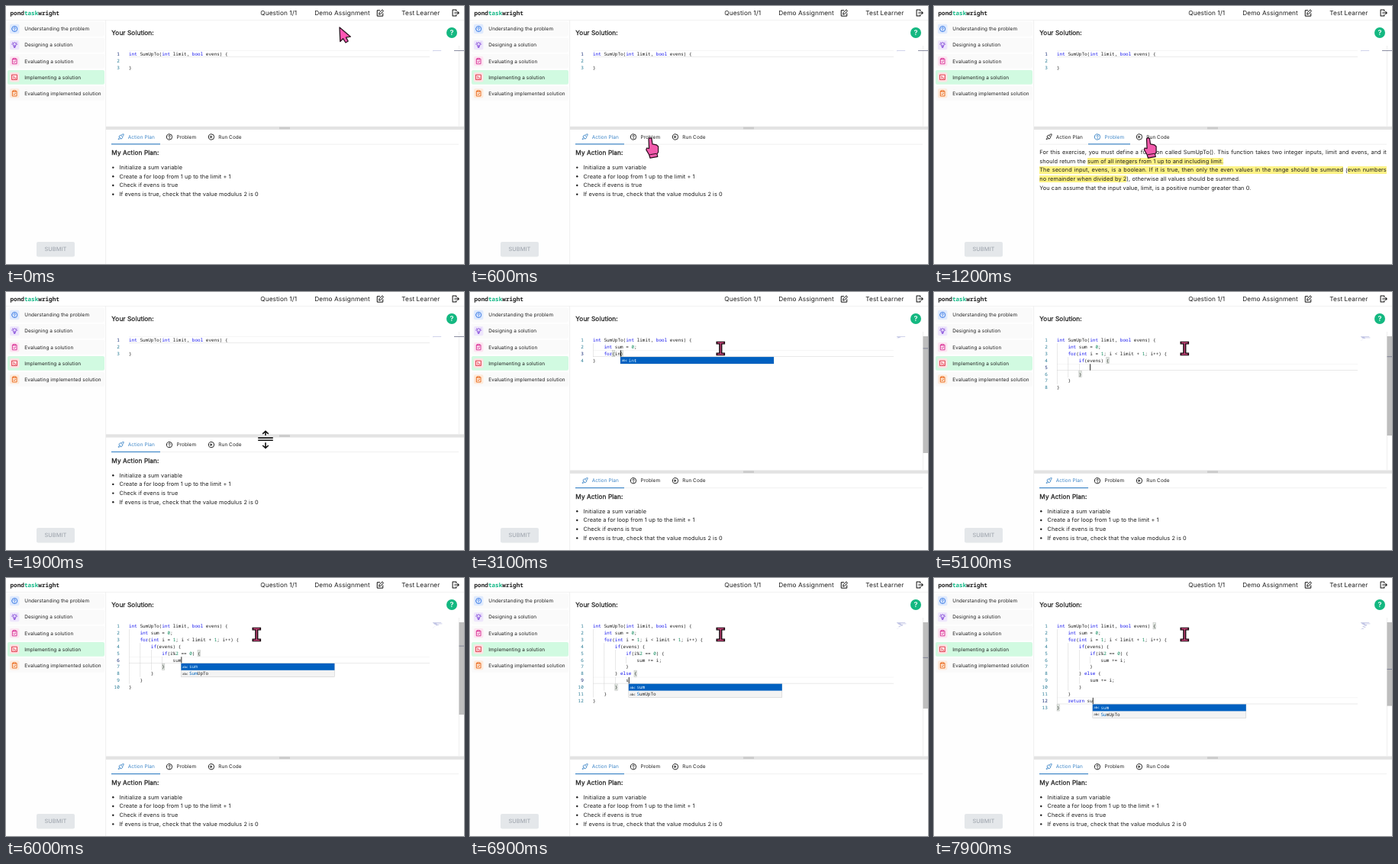
An HTML page for the animation above (8 s loop, 600 by 338 pixels).

```html
<!DOCTYPE html>
<html lang="en">
<head>
<meta charset="utf-8">
<title>Code exercise</title>
<style>
html, body { margin: 0; width: 100%; height: 100%; overflow: hidden; background: #fff; }
svg { display: block; width: 100vw; height: 100vh; text-rendering: geometricPrecision; }
text { font-family: Inter, sans-serif; fill: #1f1f1f; white-space: pre; letter-spacing: .01em; }
.mono, .mono text { font-family: "Noto Sans Mono", monospace; font-size: 6px; letter-spacing: 0; }
.heading { font-size: 8.28px; stroke: #1f1f1f; stroke-width: .28px; }
.para { font: 7.36px/11.75px Inter, sans-serif; color: #1f1f1f; white-space: nowrap; letter-spacing: .01em; }
.para .full { text-align: justify; text-align-last: justify; white-space: normal; height: 11.75px; }
mark { background: #fdf285; color: inherit; padding: .2px 0; }
.kw { fill: #1717ee; }
.num { fill: #098658; }
</style>
</head>
<body>
<svg id="stage" viewBox="0 0 600 338"></svg>
<script>
const stage = document.getElementById('stage');
const LOOP = 8000;
const CHAR = 3.6, LINE = 8.93, LEFT = 161, TOP = 58.3;

// ---------- drawing helpers ----------
const rect = (x, y, w, h, fill, extra = '') =>
  `<rect x="${x}" y="${y}" width="${w}" height="${h}" fill="${fill}" ${extra}/>`;
const text = (x, y, s, size, extra = '') =>
  `<text x="${x}" y="${y}" font-size="${size}" ${extra}>${s}</text>`;
const icon = (name, cx, cy, size, color, width = 2) =>
  `<g transform="translate(${cx - size / 2} ${cy - size / 2}) scale(${size / 24})" fill="none" stroke="${color}"
    stroke-width="${width}" stroke-linecap="round" stroke-linejoin="round"><path d="${ICONS[name]}"/></g>`;

const ICONS = {
  ask: 'M2 12a10 10 0 1 0 20 0a10 10 0 1 0-20 0M9 9.5a3 3 0 1 1 4.5 2.6q-1.5.8-1.5 2.4M12 17.5v.2',
  bulb: 'M9 17c0-3-3-4-3-8a6 6 0 0 1 12 0c0 4-3 5-3 8zM10 21h4M12 17v-5M2 9h1M21 9h1M4 3l1 1M20 3l-1 1',
  clip: 'M8 4H4v18h16V4h-4M8 2h8v4H8zM8 14l3 3 5-6',
  term: 'M3 3h18v18H3zM7 8l4 4-4 4M13 16h4',
  edit: 'M11 4H3v18h18v-8M9 16l1-5L19 2l4 4-9 9z',
  exit: 'M14 7V3H3v18h11v-4M9 12h13M18 8l4 4-4 4',
  rocket: 'M9 15l-4-4 4-5 4 0C16 3 19 2 22 2c0 3-1 6-4 9v4l-5 4zM6 15c-2 1-3 4-3 6 2 0 5-1 6-3M15 8v1',
  play: 'M2 12a10 10 0 1 0 20 0a10 10 0 1 0-20 0M10 9l5 3-5 3z'
};

// ---------- fixed parts ----------
function header() {
  return rect(0, 0, 600, 18.5, '#fff') + rect(0, 18, 600, .7, '#ececec') +
    `<text class="mono" x="5.5" y="11.6" style="font-size:7.66px;font-weight:700">pond<tspan fill="#12b886">task</tspan>wright</text>` +
    text(333.3, 12, 'Question 1/1', 8.28) + text(404.3, 12, 'Demo Assignment', 8.28) +
    icon('edit', 490, 9, 10, '#111', 2.4) +
    text(518.3, 12, 'Test Learner', 8.28) + icon('exit', 589, 9, 10.5, '#111', 2.3);
}

function sidebar() {
  const items = [
    ['Understanding the problem', 'ask', '#3478e5', '#dfeafd'],
    ['Designing a solution', 'bulb', '#8146d8', '#eee6fc'],
    ['Evaluating a solution', 'clip', '#d92d94', '#fce4f1'],
    ['Implementing a solution', 'term', '#e03445', '#fde2e4'],
    ['Evaluating implemented solution', 'clip', '#ea6a1c', '#fdeadb']
  ];
  return rect(0, 18.7, 130.5, 319.3, '#fefefe') + rect(130.3, 18.5, .8, 320, '#ececec') +
    items.map(([label, name, color, tint], i) => {
      const y = 30 + 21.1 * i;
      return rect(2, y - 9.4, 127, 18.8, i === 3 ? '#d1fae1' : '#fafafa', 'rx="2"') +
        rect(5, y - 6.2, 12.4, 12.4, tint, 'rx="2"') + icon(name, 11.2, y, 8.6, color, 2.6) +
        text(24.3, y + 2.3, label, 6.44);
    }).join('') +
    rect(40, 309, 50, 19.4, '#e4e7ea', 'rx="2"') +
    text(65, 321.4, 'SUBMIT', 7.36, 'text-anchor="middle" style="fill:#a3a9b1" font-weight="500"');
}

const TABS = [
  { label: 'Action Plan', icon: 'rocket', x: 138, w: 64, iconX: 150.5, textX: 159.8 },
  { label: 'Problem', icon: 'ask', x: 202, w: 55, iconX: 214, textX: 223.5 },
  { label: 'Run Code', icon: 'play', x: 257, w: 60, iconX: 269, textX: 278.3 }
];

function panel(active) {
  const tabs = TABS.map((tab, i) => {
    const color = i === active ? '#3f87c8' : '#1f1f1f';
    return icon(tab.icon, tab.iconX, 171.5, 8.8, color, 2.6) +
      text(tab.textX, 173.8, tab.label, 6.44, `style="fill:${color}"`) +
      (i === active ? rect(tab.x, 180.3, tab.w, 1.2, color) : '');
  }).join('');
  return rect(131, 157.8, 469, 4.4, '#e3e3e3') + rect(358, 158.6, 14, 2.8, '#cbcbcb') +
    rect(131, 162.2, 469, 260, '#fff') + rect(138, 180.8, 455, .6, '#e6e6e6') +
    tabs + (active === 0 ? plan() : problem());
}

function plan() {
  const steps = ['Initialize a sum variable', 'Create a for loop from 1 up to the limit + 1',
    'Check if evens is true', 'If evens is true, check that the value modulus 2 is 0'];
  return '<text class="heading" x="138.3" y="195">My Action Plan:</text>' + steps.map((s, i) => {
    const y = 211.4 + 11.7 * i;
    return `<circle cx="140.3" cy="${y + .2}" r="1.2" fill="#1f1f1f"/>` + text(148.5, y + 2.6, s, 7.36);
  }).join('');
}

function problem() {
  return `<foreignObject x="138.3" y="186" width="454.5" height="70"><div xmlns="http://www.w3.org/1999/xhtml" class="para">
    <div class="full">For this exercise, you must define a function called SumUpTo(). This function takes two integer inputs, limit and evens, and it</div>
    <div>should return the <mark>sum of all integers from 1 up to and including limit.</mark></div>
    <div class="full"><mark>The second input, evens, is a boolean. If it is true, then only the even values in the range should be summed</mark> (<mark>even numbers give</mark></div>
    <div><mark>no remainder when divided by 2</mark>), otherwise all values should be summed.</div>
    <div>You can assume that the input value, limit, is a positive number greater than 0.</div>
  </div></foreignObject>`;
}

// ---------- typing ----------
// "\n" is Enter; ↓ moves to the end of the next line.
const BURSTS = [
  [3100, 'int sum = 0;\nfor(in'],
  [4400, 't i = 1; i < limit + 1; i++) '],
  [6000, '{\nif(evens) {\nif(i%2 == 0) {\nsum'],
  [7900, ' += i;↓↓ else {\nsum += i;↓↓\nreturn su']
];
const TYPING_START = 2350, FOCUS = 2280;
const PAIRS = { '(': ')', '{': '}' };

function press({ before, after }, key) {
  if (key === '↓') {
    const end = (after + '\n').indexOf('\n', after.indexOf('\n') + 1);
    return { before: before + after.slice(0, end), after: after.slice(end) };
  }
  if (key === '\n') {
    const indent = before.split('\n').pop().match(/^ */)[0];
    return before.endsWith('{') && after.startsWith('}')
      ? { before: before + '\n' + indent + '    ', after: '\n' + indent + after }
      : { before: before + '\n' + indent, after };
  }
  if (key === ')' && after.startsWith(')')) return { before: before + key, after: after.slice(1) };
  return { before: before + key, after: (PAIRS[key] || '') + after };
}

const states = [{ before: 'int SumUpTo(int limit, bool evens) {\n    ', after: '\n}' }];
for (const key of BURSTS.map(b => b[1]).join('')) states.push(press(states[states.length - 1], key));

function keysAt(t) {
  let start = TYPING_START, done = 0;
  for (const [end, keys] of BURSTS) {
    if (t < end) return done + Math.max(0, Math.floor((t - start) / (end - start) * keys.length + 1e-6));
    done += keys.length;
    start = end;
  }
  return done;
}

function enclosingBrackets({ before, after }) {
  const scan = (s, i, step, enter, leave) => {
    for (let depth = 0; i >= 0 && i < s.length; i += step) {
      if (enter.includes(s[i])) depth++;
      else if (leave.includes(s[i]) && depth-- === 0) return i;
    }
    return -1;
  };
  const open = scan(before, before.length - 1, -1, ')}', '({');
  const close = scan(after, 0, 1, '({', ')}');
  return open < 0 || close < 0 ? [] : [open, before.length + close];
}

function suggestions({ before, after }) {
  const word = (before.match(/[A-Za-z]\w*$/) || [''])[0];
  if (!word) return { word, list: [] };
  const rest = before.slice(0, before.length - word.length) + ' ' + after;
  const list = [...new Set(rest.match(/[A-Za-z]\w+/g))]
    .filter(w => w.toLowerCase().startsWith(word.toLowerCase()))
    .sort((a, b) => a.length - b.length);
  return { word, list: list.length === 1 && list[0] === word ? [] : list };
}

// ---------- editor ----------
const place = (code, index) => {
  const lines = code.slice(0, index).split('\n');
  return { row: lines.length - 1, x: LEFT + lines.pop().length * CHAR };
};
const highlight = line => line.replace(/\b(?:int|bool|for|if|else|return)\b|\d+|</g, s =>
  s === '<' ? '&lt;' : `<tspan class="${/\d/.test(s) ? 'num' : 'kw'}">${s}</tspan>`);

function popup(state, caret) {
  const { word, list } = suggestions(state);
  if (!list.length) return '';
  const y = TOP + LINE * (caret.row + 1);
  const rows = list.map((w, i) => {
    const top = y + LINE * i, fg = i ? '#222' : '#fff', hit = i ? '#0066bf' : '#c6e6ff';
    return (i ? '' : rect(caret.x, top, 201, LINE, '#0060c0')) +
      `<text x="${caret.x + 1.5}" y="${top + 6}" style="font-size:4.2px;fill:${fg}">abc</text>` +
      `<text x="${caret.x + 10.6}" y="${top + 6.5}" style="fill:${fg}"><tspan fill="${hit}">${w.slice(0, word.length)}</tspan>${w.slice(word.length)}</text>`;
  }).join('');
  return rect(caret.x, y, 201, LINE * list.length, '#f3f3f3', 'stroke="#c8c8c8" stroke-width=".5"') + rows;
}

function editor(state, focused, height, hovered) {
  const code = state.before + state.after, lines = code.split('\n');
  const caret = focused ? place(code, state.before.length) : { row: 0, x: LEFT };
  const rowTop = TOP + LINE * caret.row;
  let out = rect(LEFT, rowTop, 394, .6, '#f0f0f0') + rect(LEFT, rowTop + LINE - .9, 394, .8, '#e4e4e4');
  lines.forEach((line, i) => {
    const y = TOP + LINE * i, indent = line.match(/^ */)[0].length / 4;
    if (focused) for (let k = 0; k < indent; k++) out += rect(LEFT + .2 + k * 4 * CHAR, y, .5, LINE, '#d0d0d0');
    const col = line.length - line.trimStart().length;
    if (line.trim()) out += rect(559 + col * .31, 58.2 + i * .75, (line.length - col) * .31, .5, '#7079c4', 'opacity=".65"');
  });
  if (focused) for (const index of enclosingBrackets(state)) {
    const { row, x } = place(code, index);
    out += rect(x, TOP + LINE * row + .3, CHAR, LINE - .6, '#e5ece5', 'stroke="#b9b9b9" stroke-width=".5"');
  }
  lines.forEach((line, i) => {
    const y = TOP + LINE * i + 6.6;
    out += `<text x="148.8" y="${y}" text-anchor="end" style="fill:${i === caret.row ? '#0b216f' : '#237893'}">${i + 1}</text>` +
      `<text x="${LEFT}" y="${y}">${highlight(line)}</text>`;
  });
  const total = height + (lines.length - 1) * LINE;
  out += rect(593.2, 52, .6, height + 5, '#e4e4e4');
  if (hovered) out += rect(593.5, 58, 6.5, height * height / total, '#bdbdbd');
  out += rect(hovered ? 593.5 : 587, 58 + caret.row * LINE / total * height, 13, .8, '#70748c');
  if (focused) out += rect(caret.x, rowTop + .3, .9, LINE - .6, '#111') + popup(state, caret);
  return out;
}

// ---------- pointer ----------
const RESIZE = 'M-9.8-1.5H9.8M-9.8 1.7H9.8M0-9V-4.6M0 4.6V10.5M-3.8-6.8L0-10.2 3.8-6.8M-3.8 8.4L0 11.8 3.8 8.4';
const POINTERS = {
  arrow: '<path d="M0 0L.8 18.5 4.6 14.8 8 20 11.2 18 8.4 13.2 14.4 12.2Z" fill="#ff55b4" stroke="#2a1420" stroke-width="1.3" stroke-linejoin="round"/>',
  hand: '<path d="M-2 0Q0-2.4 2 0L3 6.8 8 7.8 10.6 10V17.5L9 19.8 9.8 23.4 0 25.2-1.4 20.8-5.2 14.4-4.4 12-1.4 12.6Z" fill="#f25aac" stroke="#2a0d1c" stroke-width="1.2" stroke-linejoin="round"/><path d="M-.6 20.8l9-1.5" stroke="#2a0d1c"/>',
  beam: '<path d="M-5.8-9.3H5.8V-5.6H2.1V5.6H5.8V9.3H-5.8V5.6H-2.1V-5.6H-5.8Z" fill="#18090f"/><path d="M-4.2-7.5H4.2M-4.2 7.5H4.2M0-7.5V7.5" stroke="#d0487f" stroke-width="1.3"/>',
  resize: `<g fill="none"><path d="${RESIZE}" stroke="#fff" stroke-width="3"/><path d="${RESIZE}" stroke="#111" stroke-width="1.6"/></g>`
};
const PATH = [[0, 437, 28], [100, 437, 28], [550, 236, 174], [800, 236, 174], [1000, 300, 190],
  [1200, 280.5, 174], [1420, 180, 173], [1530, 180, 173], [1720, 340, 164], [1750, 340, 164],
  [1900, 340, 192.3], [2070, 340, 239.7], [2100, 340, 239.7], [2260, 328.3, 74], [LOOP, 328.3, 74]];
const DRAG = [[0, 0], [1750, 0], [1900, 28.3], [2070, 75.7], [LOOP, 75.7]];
const PROBLEM_CLICK = 620, PLAN_CLICK = 1480;

function sample(track, t, ease = u => u) {
  const i = Math.max(1, track.findIndex(k => k[0] > t));
  const a = track[i - 1], b = track[i], u = ease((t - a[0]) / (b[0] - a[0]));
  return a.slice(1).map((v, n) => v + (b[n + 1] - v) * u);
}
const smooth = u => u * u * (3 - 2 * u);

function pointerKind(t, x, y, shift) {
  if (t >= 1700 && t < 2110) return 'resize';
  if (y > 163 + shift && y < 181 + shift && x > 138 && x < 317) return 'hand';
  return y > 55 && y < 157 + shift && x > 138 ? 'beam' : 'arrow';
}

// ---------- scene ----------
stage.innerHTML = rect(0, 0, 600, 338, '#fff') + '<g id="editor" class="mono"></g><g id="panel"></g>' +
  sidebar() + header() + '<text class="heading" x="138.3" y="37.5">Your Solution:</text>' +
  '<circle cx="584" cy="35" r="7" fill="#14b881"/>' +
  text(584, 38.3, '?', 9.2, 'text-anchor="middle" font-weight="600" style="fill:#fff"') + '<g id="pointer"></g>';
const [editorEl, panelEl, pointerEl] = ['editor', 'panel', 'pointer'].map(id => document.getElementById(id));

const shown = new Map();
function setContent(el, key, build) {
  if (shown.get(el) === key) return;
  shown.set(el, key);
  el.innerHTML = build();
}

function draw(t) {
  const [shift] = sample(DRAG, t);
  const dragging = t >= 1750 && t <= 2070;
  const [x, y] = sample(PATH, t, dragging ? undefined : smooth);
  const kind = pointerKind(t, x, y, shift);
  const keys = keysAt(t), focused = t >= FOCUS, hovered = kind === 'beam';
  const tab = t >= PROBLEM_CLICK && t < PLAN_CLICK ? 1 : 0;

  setContent(editorEl, [keys, focused, hovered, shift].join(), () =>
    editor(states[keys], focused, 100.5 + shift, hovered));
  setContent(panelEl, tab, () => panel(tab));
  panelEl.setAttribute('transform', `translate(0 ${shift})`);
  setContent(pointerEl, kind, () => POINTERS[kind]);
  pointerEl.setAttribute('transform', `translate(${x} ${y})`);
}

const started = performance.now();
function tick() {
  draw((performance.now() - started) % LOOP);
  requestAnimationFrame(tick);
}
draw(0);
requestAnimationFrame(tick);
</script>
</body>
</html>
```
